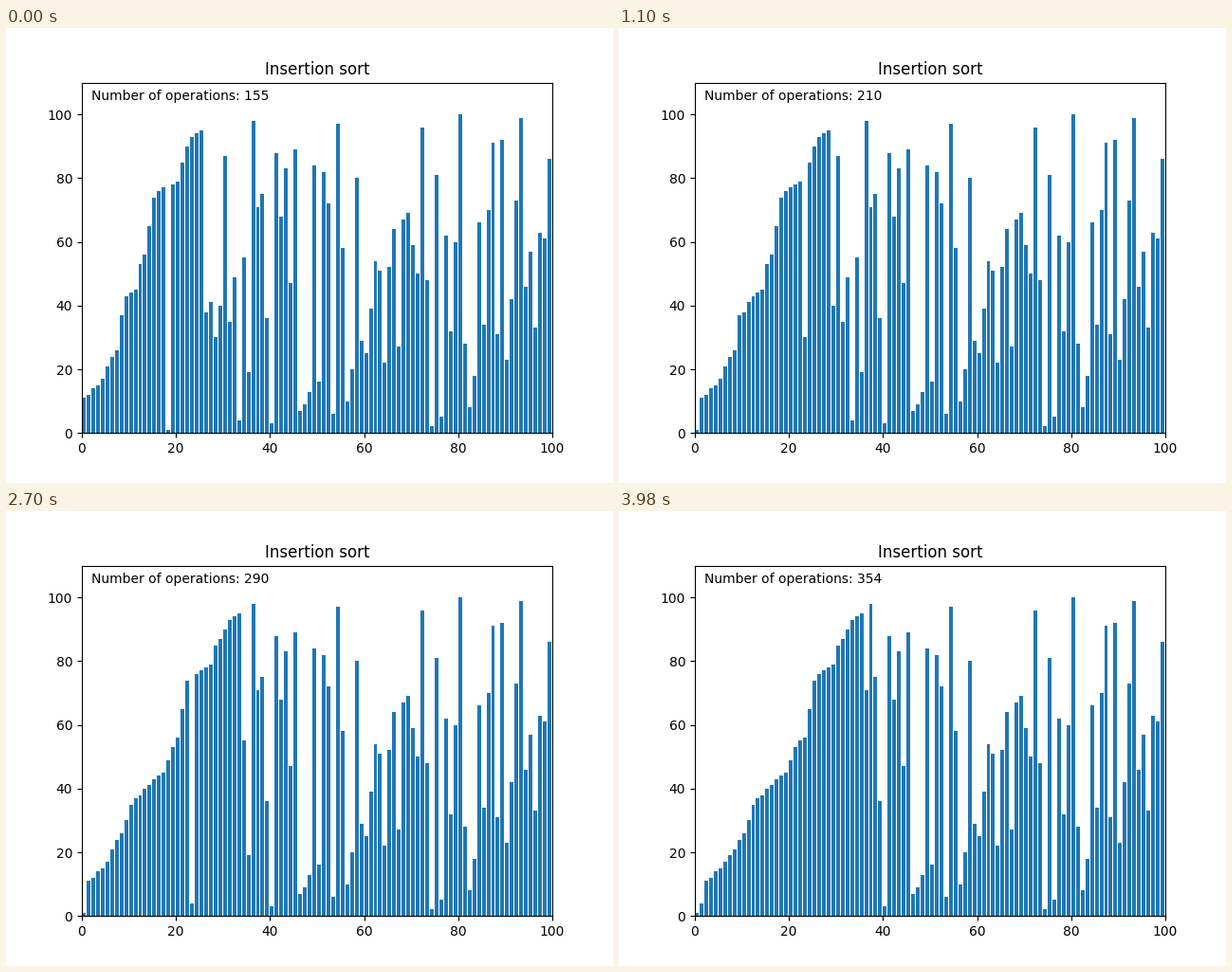
Recreate the animation shown at these times as a matplotlib script. Size 640 by 480 pixels, loop 4 s.

```python
import matplotlib.pyplot as plt
from matplotlib.animation import FuncAnimation

FRAMES = 200
INTERVAL = 20
FIRST_COUNT = 155

VALUES = [
    11, 12, 14, 15, 17, 21, 24, 26, 37, 43, 44, 45, 53, 56, 65, 74, 76, 77, 1, 78,
    79, 85, 90, 93, 94, 95, 38, 41, 30, 40, 87, 35, 49, 4, 55, 19, 98, 71, 75, 36,
    3, 88, 68, 83, 47, 89, 7, 9, 13, 84, 16, 82, 72, 6, 97, 58, 10, 20, 80, 29,
    25, 39, 54, 51, 22, 52, 64, 27, 67, 69, 59, 50, 96, 48, 2, 81, 5, 62, 32, 60,
    100, 28, 8, 18, 66, 34, 70, 91, 31, 92, 23, 42, 73, 99, 46, 57, 33, 63, 61, 86,
]


def insertion_sort(a):
    """Yield the array before the first swap and after every swap."""
    yield a
    for i in range(1, len(a)):
        j = i
        while j > 0 and a[j] < a[j - 1]:
            a[j], a[j - 1] = a[j - 1], a[j]
            j -= 1
            yield a


steps = [state.copy() for _, state in zip(range(FRAMES), insertion_sort(VALUES.copy()))]

fig, ax = plt.subplots(figsize=(6.4, 4.8), dpi=100)
ax.set_title("Insertion sort")
ax.set_xlim(0, len(VALUES))
ax.set_ylim(0, 1.1 * max(VALUES))
bars = ax.bar(range(len(VALUES)), VALUES, align="edge")
label = ax.text(0.02, 0.95, "", transform=ax.transAxes)


def update(n):
    for bar, height in zip(bars, steps[n]):
        bar.set_height(height)
    label.set_text(f"Number of operations: {FIRST_COUNT + n}")
    return [*bars, label]


anim = FuncAnimation(fig, update, frames=FRAMES, interval=INTERVAL,
                     repeat=True, repeat_delay=0)
plt.show()
```
